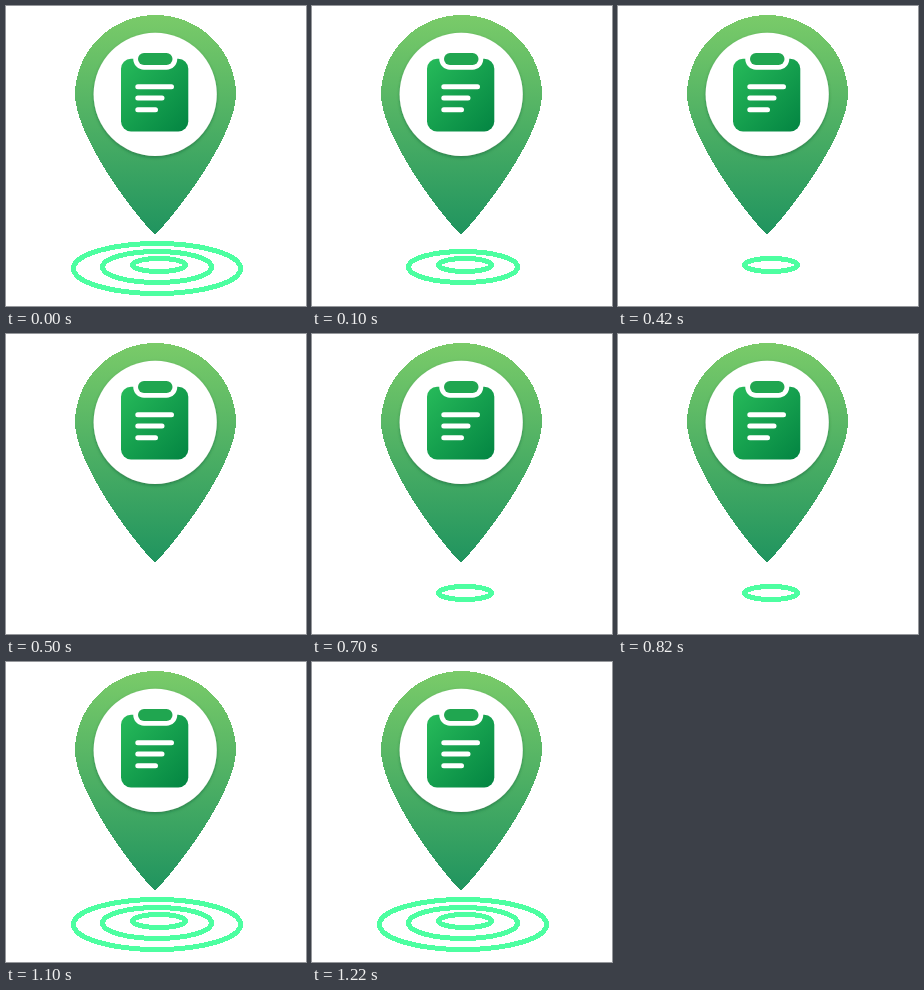
An HTML page without scripts for the animation above (1.3 s loop, 300x300 px).

```html
<!DOCTYPE html>
<html lang="en">
<head>
<meta charset="utf-8">
<title>Map pin</title>
<style>
  html, body { margin: 0; width: 100%; height: 100%; overflow: hidden; background: #fff; }
  svg { display: block; width: 100vw; height: 100vh; }
  .pin, .rings { shape-rendering: crispEdges; }
  .pin { fill: url(#pin); }
  .rings { fill: none; stroke: #4dffa1; stroke-width: 5; }
  .rings ellipse { animation: 1300ms step-end infinite; }
  .rings .outer { animation-name: outer; }
  .rings .middle { animation-name: middle; }
  .rings .inner { animation-name: inner; }
  .lines { fill: none; stroke: #fff; stroke-width: 5; stroke-linecap: round; }

  /* Rings vanish from the outside in, then return from the inside out. */
  @keyframes outer {
    0% { visibility: visible; }
    7.6923% { visibility: hidden; }
    84.6154%, 100% { visibility: visible; }
  }
  @keyframes middle {
    0% { visibility: visible; }
    23.0769% { visibility: hidden; }
    69.2308%, 100% { visibility: visible; }
  }
  @keyframes inner {
    0% { visibility: visible; }
    38.4615% { visibility: hidden; }
    53.8462%, 100% { visibility: visible; }
  }
</style>
</head>
<body>
<svg viewBox="0 0 300 300">
  <defs>
    <linearGradient id="pin" x1="0" y1="0" x2="0" y2="1">
      <stop offset="0" stop-color="#7acb69"/>
      <stop offset="1" stop-color="#20945f"/>
    </linearGradient>
    <linearGradient id="board" x1="0" y1="0" x2="1" y2="1">
      <stop offset="0" stop-color="#27bb5a"/>
      <stop offset="1" stop-color="#038442"/>
    </linearGradient>
    <filter id="shadow" x="-10%" y="-10%" width="120%" height="120%">
      <feDropShadow dx="0" dy="1.5" stdDeviation="1.5" flood-color="#0b5a30" flood-opacity=".5"/>
    </filter>
  </defs>

  <path class="pin" d="M149.5 9C194 9 230 45 230 89C229 126 183.5 191.5 151 227Q149 229 147 227C114.5 191.5 70 126 69 89C69 45 105 9 149.5 9Z"/>
  <circle cx="149.2" cy="88.3" r="61.6" fill="#fff" filter="url(#shadow)"/>

  <rect x="115" y="52.7" width="67.3" height="72.7" rx="10" fill="url(#board)"/>
  <rect x="132" y="47" width="34.5" height="12" rx="6" fill="#20a650" stroke="#fff" stroke-width="9.5" paint-order="stroke"/>
  <path class="lines" d="M131.8 80.7H165.5M131.8 92H156M131.8 103.8H149.5"/>

  <g class="rings">
    <ellipse class="outer" cx="151" cy="262.5" rx="83.5" ry="25"/>
    <ellipse class="middle" cx="151" cy="261" rx="54.5" ry="15.5"/>
    <ellipse class="inner" cx="153" cy="259" rx="26.5" ry="6.5"/>
  </g>
</svg>
</body>
</html>
```
